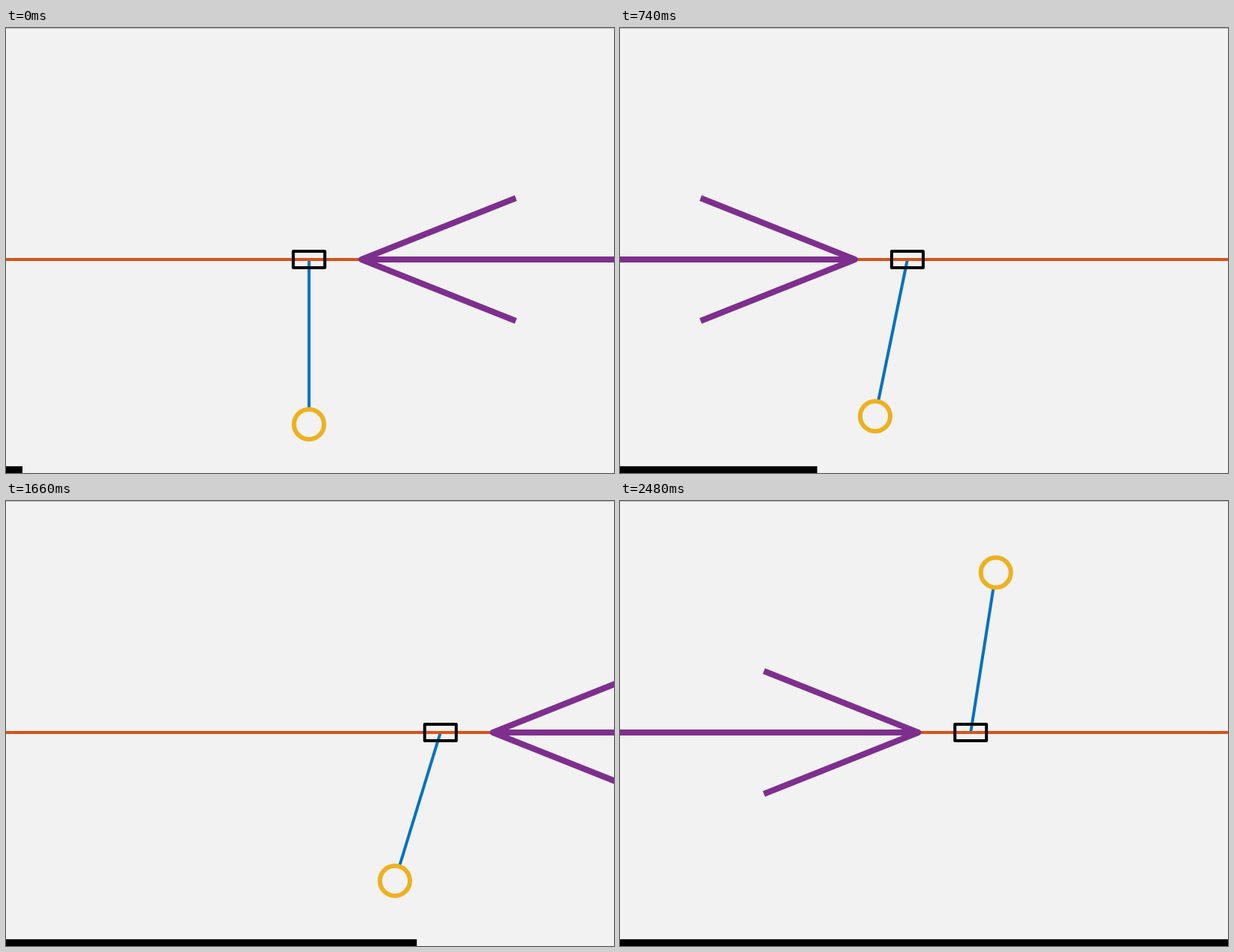
Animation of 810x594 px, one loop 2.55 s. Source, as an HTML page with a canvas:

```html
<!DOCTYPE html>
<html lang="en">
<head>
<meta charset="utf-8">
<title>Cart-pole swing-up</title>
<style>
  html, body { margin: 0; height: 100%; overflow: hidden; background: #f2f2f2; }
  canvas { display: block; }
</style>
</head>
<body>
<canvas id="stage" width="810" height="594"></canvas>
<script>
const ctx = document.getElementById('stage').getContext('2d');
const W = 810, H = 594, RAIL = 309, STEPS = 37, LOOP = 2550;
const POLE_X = 139.5, POLE_Y = 220; // the axes are scaled unequally

// [step, cart x, pole angle from hanging]
const keys = [
  [0, 403.7, 0], [2, 391, 0.09], [4, 356.4, 0.317], [6, 325.8, 0.467],
  [8, 325.2, 0.348], [10, 356.5, -0.045], [11, 382.9, -0.313], [13, 433, -0.797],
  [16, 513.8, -1.295], [18, 559.3, -1.408], [20, 590.5, -1.345], [22, 603, -1.07],
  [24, 578.8, -0.45], [25, 554.4, -0.09], [26, 518.2, 0.393], [28, 465.1, 1.178],
  [29, 448.3, 1.482], [31, 427.7, 1.985], [33, 428.7, 2.35], [36, 467.2, 2.899]
];

function duration(step) {
  if ([1, 2, 3, 24, 32].includes(step)) return 60;
  return step === 20 ? 80 : 70;
}

function stepAt(ms) {
  let step = 0;
  while (step < STEPS - 1 && ms >= duration(step)) ms -= duration(step++);
  return step;
}

const slope = (k, c) => (keys[k + 1][c] - keys[k][c]) / (keys[k + 1][0] - keys[k][0]);

function tangent(k, c) {
  if (k === 0) return 0; // starts at rest
  if (k === keys.length - 1) return slope(k - 1, c);
  const before = keys[k][0] - keys[k - 1][0], after = keys[k + 1][0] - keys[k][0];
  return (slope(k - 1, c) * after + slope(k, c) * before) / (before + after);
}

// Cubic Hermite interpolation of column c
function sample(step, c) {
  let k = 0;
  while (k < keys.length - 2 && step >= keys[k + 1][0]) k++;
  const h = keys[k + 1][0] - keys[k][0], u = (step - keys[k][0]) / h, v = 1 - u;
  return keys[k][c] * v * v * (1 + 2 * u) + keys[k + 1][c] * u * u * (3 - 2 * u)
    + h * u * v * (tangent(k, c) * v - tangent(k + 1, c) * u);
}

function line(color, width, ...points) {
  ctx.strokeStyle = color;
  ctx.lineWidth = width;
  ctx.beginPath();
  points.forEach(([x, y]) => ctx.lineTo(x, y));
  ctx.stroke();
}

function drawForce(cart, side) {
  const tip = [cart + side * 69.8, RAIL], end = cart + side * 275.5;
  line('#7e2f8e', 8, tip, [side > 0 ? W : 0, RAIL]);
  line('#7e2f8e', 8, [end, RAIL - 82], tip, [end, RAIL + 82]);
}

function draw(step) {
  const cart = sample(step, 1), angle = sample(step, 2);
  const along = r => [cart + r * POLE_X * Math.sin(angle), RAIL + r * POLE_Y * Math.cos(angle)];
  // Bang-bang force: the arrow stands on the side it pushes from
  const side = step < 5 || (step > 16 && step < 30) ? 1 : -1;

  ctx.fillStyle = '#f2f2f2';
  ctx.fillRect(0, 0, W, H);
  ctx.fillStyle = '#c0c0c0';
  ctx.fillRect(0, 0, W, 1);

  ctx.lineJoin = 'round';
  line('#0072bd', 4, along(0), along(0.9));
  line('#d95319', 4, [0, RAIL], [W, RAIL]);

  ctx.strokeStyle = '#edb120';
  ctx.lineWidth = 6;
  ctx.beginPath();
  ctx.arc(...along(1), 20, 0, 2 * Math.PI);
  ctx.stroke();

  ctx.strokeStyle = '#000';
  ctx.lineWidth = 4;
  ctx.strokeRect(cart - 21, RAIL - 11, 42, 22);
  drawForce(cart, side);

  ctx.fillStyle = '#000';
  ctx.fillRect(0, 585, W * (step + 1) / STEPS, 9);
}

const start = performance.now();
function tick() {
  draw(stepAt((performance.now() - start) % LOOP));
  requestAnimationFrame(tick);
}
tick();
</script>
</body>
</html>
```
